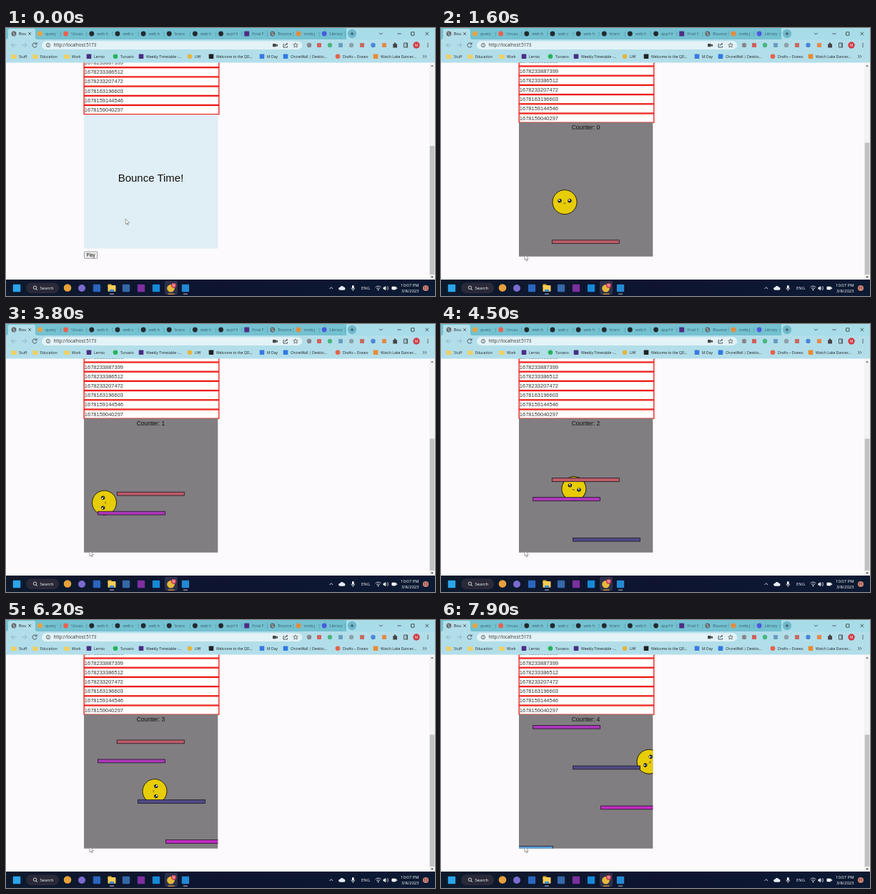
Recreate the animation shown at these times as an HTML page. Size 600 px wide and 375 px high, loop 8 s.

```html
<!DOCTYPE html>
<html lang="en">
<head>
<meta charset="utf-8">
<title>Bounce</title>
<style>
html, body { margin: 0; width: 100%; height: 100%; overflow: hidden; background: #fcfafc; }
svg { display: block; width: 600px; height: 375px; }
text { white-space: pre; }
.ui { font-family: "Open Sans", "Noto Sans", sans-serif; }
.page { font-family: "Liberation Sans", Arial, sans-serif; }
</style>
</head>
<body>
<svg id="stage" viewBox="0 0 600 375" xmlns="http://www.w3.org/2000/svg">
  <defs>
    <clipPath id="board"><rect x="109" y="132.3" width="187.3" height="187.5"/></clipPath>
    <linearGradient id="bar"><stop offset="0" stop-color="#0d1a2c"/><stop offset=".5" stop-color="#0e1430"/><stop offset="1" stop-color="#0c1a33"/></linearGradient>
  </defs>
  <rect width="600" height="375" fill="#fcfafc"/>
  <g id="rows"></g>
  <g id="menu"></g>
  <g id="game" clip-path="url(#board)">
    <rect x="109" y="132" width="188" height="188" fill="#807e80"/>
    <text id="counter" class="page" x="202.5" y="141.8" font-size="8.5" text-anchor="middle" fill="#111"></text>
    <g id="ball"></g>
    <g id="platforms"></g>
  </g>
  <g id="browser"></g>
  <g id="taskbar"></g>
  <path id="cursor" d="M0 0V7.6L1.8 6L3 8.7L4 8.2L2.9 5.6H5.2Z" fill="#fff" stroke="#555" stroke-width=".55"/>
</svg>
<script>
const $ = id => document.getElementById(id);

// markup helpers
const rect = (x, y, w, h, fill, extra = '') =>
  `<rect x="${x}" y="${y}" width="${w}" height="${h}" fill="${fill}" ${extra}/>`;
const dot = (x, y, r, fill, extra = '') => `<circle cx="${x}" cy="${y}" r="${r}" fill="${fill}" ${extra}/>`;
const line = (d, color = '#333', width = 0.8) =>
  `<path d="${d}" fill="none" stroke="${color}" stroke-width="${width}"/>`;
const label = (x, y, size, str, fill = '#222', extra = '', font = 'ui') =>
  `<text class="${font}" x="${x}" y="${y}" font-size="${size}" fill="${fill}" ${extra}>${str}</text>`;
const square = (x, y, size, fill) => rect(x - size / 2, y - size / 2, size, size, fill, 'rx=".8"');
const globe = (x, y) => dot(x, y, 3.4, '#5c6468') + line(`M${x - 2} ${y - 1}h3M${x - 1} ${y + 1.4}h3`, '#dcebef', 0.8);

function drawRows() {
  const ids = ['1678233891386', '1678233887399', '1678233386512', '1678233207472',
    '1678163196603', '1678159144546', '1678159040297'];
  $('rows').innerHTML = ids.map((id, i) => {
    const y = 42.5 + 13.2 * (i - 1);
    return rect(109.2, y, 188.6, 12.2, '#fff', 'stroke="#ec1712" stroke-width="1.3"') +
      label(109.8, y + 8.5, 7.5, id, '#333', '', 'page');
  }).join('');
}

function drawMenu() {
  $('menu').innerHTML = rect(109, 121.5, 187.5, 187, '#e0eef5') +
    label(202.5, 214.6, 15, 'Bounce Time!', '#111', 'text-anchor="middle"', 'page') +
    rect(109.5, 313, 18.3, 9.3, '#efefef', 'rx="1" stroke="#777" stroke-width=".7"') +
    label(118.6, 319.8, 6.3, 'Play', '#111', 'text-anchor="middle"', 'page');
}

function drawTabs() {
  const tabs = [['query', '#e8a33c'], ['Uncau', '#e9604f'], ['web h', '#24292f'], ['web s', '#24292f'],
    ['web h', '#24292f'], ['branc', '#24292f'], ['web h', '#24292f'], ['app14', '#24292f'],
    ['Final F', '#4b2e83'], ['Bounce', ''], ['node.j', '#e88a3a'], ['Library', '#4a5be0']];
  const first = rect(0, 0, 600, 16, '#a8dce9') + rect(0, 0, 476, 16, '#74c1d1') +
    '<path d="M0 16Q3 16 3 13V3Q3 1 5 1H38Q41 1 41 3V13Q41 16 44 16Z" fill="#b2deea"/>' +
    globe(11, 8) + label(18, 10.2, 5.6, 'Bou') + line('M31.3 6.2l3.6 3.6M34.9 6.2l-3.6 3.6');
  const rest = tabs.map(([name, color], i) => {
    const x = 47.5 + 36.15 * i;
    const icon = !color ? globe(x, 8) : i === 8 ? square(x, 8, 7, color) : dot(x, 8, 3.4, color);
    return icon + label(x + 7.5, 10.2, 5.5, name, '#33616e') + line(`M${x + 29} 5v6.5`, '#4b97aa', 0.6);
  }).join('');
  return first + rest + dot(484, 8, 6.2, '#70bace') + line('M481.5 8h5M484 5.5v5') +
    line('M522 6.8l2.3 2.3l2.3-2.3M547.5 8h5M566.5 5.8h4.4v4.4h-4.4ZM586.5 5.7l4.6 4.6M591.1 5.7l-4.6 4.6');
}

function drawToolbar() {
  const extensions = [[424, '#8a858c'], [438, '#d0605a'], [453, '#4cb583'], [468, '#6a9cc0'],
    [483, '#8fa0a8'], [498, '#c66a62'], [513.5, '#4a86d6'], [529, '#e08a4a']];
  return rect(0, 16, 600, 32.5, '#b2deea') +
    line('M14.5 24h-7M10.5 21l-3 3l3 3', '#84acb8') + line('M22 24h7M26 21l3 3l-3 3', '#84acb8') +
    line('M42.6 22.2A3.1 3.1 0 1 0 43 25M43 20.3v2.4h-2.4') +
    rect(50, 18.3, 364, 11.8, '#e2f2f7', 'rx="5.9"') +
    dot(59, 24, 2.7, 'none', 'stroke="#444" stroke-width=".7"') + line('M59 22.3v.7M59 23.6v2') +
    label(66.5, 26.3, 6.2, 'http://localhost:5173', '#333') +
    rect(373, 22, 4.8, 4.2, '#444', 'rx=".6"') + '<path d="M378 23.5l2-1v3.4l-2-1Z" fill="#444"/>' +
    line('M389 22.5h-1v4.5h5.5v-1.7M390 25q.4-3 3.6-2.8M392.3 20.8l1.5 1.4l-1.5 1.4') +
    line('M405 20.8l1 2.2l2.3.2l-1.8 1.5l.6 2.3l-2.1-1.3l-2.1 1.3l.6-2.3l-1.8-1.5l2.3-.2Z', '#444', 0.7) +
    extensions.map(([x, c], i) => i % 2 ? square(x, 24, 6, c) : dot(x, 24, 3.2, c)).join('') +
    '<path d="M541.2 22.2h1.6q-.2-2 1.2-2q1.4 0 1.2 2h1.8v5.4h-5.8Z" fill="#444"/>' +
    line('M556.5 21h5v6h-5ZM560 21v6') +
    dot(574, 24, 4.7, '#cf3b46') + label(574, 26, 5, 'M', '#fff', 'text-anchor="middle"') +
    dot(590, 21.7, 0.7, '#333') + dot(590, 24, 0.7, '#333') + dot(590, 26.3, 0.7, '#333');
}

function drawBookmarks() {
  const marks = [[11, 'Stuff', 'folder'], [41, 'Education', 'folder'], [85, 'Work', 'folder'],
    [116, 'Lernio', '#4b2e83'], [153, 'Tunavio', '#27b35a'], [189, 'Weekly Timetable -...', '#4b2e83'],
    [257, 'UW', '#e6b53c'], [287, 'Welcome to the QD...', '#222'], [358, 'M Day', '#3b78de'],
    [391, 'ChoreWall | Deskto...', '#2f7ae0'], [464, 'Drafts – Drawo', '#e5634a'],
    [517, 'Watch Lake Dancer...', '#e98b31']];
  return marks.map(([x, name, kind], i) => {
    const icon = kind === 'folder'
      ? `<path d="M${x - 3.6} 36.8h2.8l1 1h3.6v5.2h-7.4Z" fill="#f0cf62"/>`
      : i % 2 || i === 8 ? square(x, 39.8, 6.6, kind) : dot(x, 39.8, 3.3, kind);
    return icon + label(x + 7, 41.7, 5.15, name);
  }).join('') + line('M583 37.8l1.9 2l-1.9 2M586 37.8l1.9 2l-1.9 2');
}

function drawBrowser() {
  $('browser').innerHTML = drawTabs() + drawToolbar() + drawBookmarks() +
    rect(592, 48.5, 8, 304, '#f3f2f3') +
    '<path d="M594 54l2-2.6l2 2.6Z" fill="#777"/><path d="M594 347.5l2 2.6l2-2.6Z" fill="#555"/>' +
    '<rect id="thumb" x="592.7" width="6.6" fill="#c1c0c2"/>';
}

function drawTaskbar() {
  const apps = [[127, '#2b66bd'], [168, '#3568a8'], [189, '#7d2fa0'], [210, '#1689d6'], [251, '#2389d4']];
  const mid = 'text-anchor="middle"', end = 'text-anchor="end"';
  $('taskbar').innerHTML = rect(0, 352, 600, 23, 'url(#bar)') +
    square(15, 364, 10.5, '#2ba5ea') +
    rect(28, 356.3, 46, 15, '#29293a', 'rx="7.5"') +
    dot(40.5, 363.3, 2.2, 'none', 'stroke="#fff" stroke-width=".8"') + line('M42.1 365l2 2', '#fff') +
    label(47.5, 366.2, 6, 'Search', '#fff') +
    dot(86, 363.5, 5.3, '#e7a03a') + dot(106, 364, 5, '#7b6bd0') +
    apps.map(([x, c]) => square(x, 364, 10.3, c)).join('') +
    rect(142.5, 358.5, 5, 4, '#e0a92d') + rect(142.5, 360, 11, 8.8, '#f7cd55', 'rx=".8"') +
    rect(145, 366, 6, 2.8, '#3489d6') +
    rect(222, 354, 18, 19, '#2b3149', 'rx="2"') +
    dot(230.5, 364.2, 5.3, '#e5b83b') + dot(234.5, 360.3, 3.5, '#cf3b56') +
    label(234.5, 362, 4.5, 'M', '#fff', mid) +
    rect(145, 371.6, 6, 1.2, '#9aa7b3') + rect(226.5, 371.6, 9, 1.2, '#e8a33c') + rect(248, 371.6, 6, 1.2, '#9aa7b3') +
    line('M452.5 365l2.3-2.3l2.3 2.3', '#fff') +
    '<path d="M467 366.7a2 2 0 0 1 .2-4a2.8 2.8 0 0 1 5-.2a2.1 2.1 0 0 1 .4 4.2Z" fill="#e6edf3"/>' +
    rect(484, 360, 2.6, 4.8, '#fff', 'rx="1.3"') + line('M482.8 363.5q0 2.6 2.5 2.6t2.5-2.6M485.3 366v2', '#fff', 0.7) +
    label(503, 366.1, 5.8, 'ENG', '#fff', mid) +
    line('M516.7 362.8q3.8-3.4 7.6 0M518.2 364.7q2.3-2 4.6 0', '#fff') + dot(520.5, 366.4, 0.9, '#fff') +
    '<path d="M527.5 362.8h1.5l2-1.9v6.4l-2-1.9h-1.5Z" fill="#fff"/>' + line('M532.2 362.4q1.4 1.7 0 3.4M533.5 361q2.6 3.1 0 6.2', '#fff', 0.6) +
    rect(539.5, 361.8, 6, 4.4, '#fff', 'rx=".8"') + rect(546, 363, 1, 2, '#fff') +
    label(577.5, 361.8, 5.9, '10:07 PM', '#fff', end) + label(577.5, 369.8, 5.9, '3/8/2023', '#fff', end) +
    dot(587, 364, 4.1, '#c98172') + label(587, 365.8, 4.6, '11', '#2a1a1a', mid);
}

// Platforms rise steadily; y is the centre height at START.
const START = 1, RISE = 28, GRAVITY = 260, REST = 14.5;
const platforms = [
  { x: 155.3, y: 316, from: 1, color: '#bd5c68' },
  { x: 128.5, y: 343, from: 1.85, color: '#ad37bb' },
  { x: 184.5, y: 399.7, from: 3.85, color: '#514a86' },
  { x: 223.5, y: 455.7, from: 5.85, color: '#c32bc4' },
  { x: 62.5, y: 512, from: 7.85, color: '#5b9fda' }
];
const platformY = (p, t) => p.y - RISE * (t - START);

function drawGame() {
  $('platforms').innerHTML = platforms.map(p =>
    rect(p.x, 0, 94, 4.8, p.color, 'stroke="#1d1722" stroke-width=".8"')).join('');
  const eye = x => dot(x, -1.8, 2.7, '#17151c') + dot(x - 0.7, -2.7, 1.1, '#fff') + dot(x + 0.9, -0.8, 0.6, '#ddd');
  $('ball').innerHTML = dot(0, 0, 17, '#e7cc08', 'stroke="#17150a" stroke-width=".9"') +
    eye(-7) + eye(7) + line('M-1.7 1.2Q-.8 2.6 0 1.3Q.8 2.6 1.7 1.2', '#3b2a08', 0.7);
}

// Linear interpolation through [time, value] keys.
function track(keys, t) {
  const i = keys.findIndex(k => k[0] > t);
  if (i === 0) return keys[0][1];
  if (i < 0) return keys[keys.length - 1][1];
  const [t0, a] = keys[i - 1], [t1, b] = keys[i];
  return a + (b - a) * (t - t0) / (t1 - t0);
}

const ballX = [[2.7, 173], [3, 137.5], [4.1, 137.5], [5.2, 270.5], [5.25, 275], [5.65, 275], [6.2, 208], [6.3, 204], [7.2, 204], [7.9, 291]];
const ballTurn = [[2.7, 0], [3, -90], [4.1, -90], [5.2, 230], [5.25, 242], [5.65, 260], [6.2, 90], [6.3, 80], [7.2, 80], [7.9, 303]];
const squash = [[1.7, 0], [2.5, 1], [2.85, 0], [4.85, 0], [5.2, 1], [5.5, 0]];
const leaps = [1, 2.85, 4.85, 7.79];

// Free fall after each leap, until the next platform catches the ball.
function ballY(t) {
  const n = leaps.filter(s => s <= t).length - 1, began = leaps[n];
  const top = n ? platformY(platforms[n - 1], began) - REST : 150;
  return Math.min(top + GRAVITY * (t - began) ** 2, platformY(platforms[n], t) - REST);
}

function render(t) {
  const playing = t >= START;
  $('menu').style.display = playing ? 'none' : '';
  $('game').style.display = playing ? '' : 'none';
  $('rows').setAttribute('transform', `translate(0 ${playing ? 11.5 : 0})`);
  $('thumb').setAttribute('y', playing ? 160.5 : 165);
  $('thumb').setAttribute('height', playing ? 184.5 : 180);

  const k = Math.min(t / 0.8, 1), glide = k * k * (3 - 2 * k);
  $('cursor').setAttribute('transform', `translate(${167.2 - 50 * glide} ${267 + 50.3 * glide})`);
  if (!playing) return;

  $('counter').textContent = 'Counter: ' + Math.floor((t + 0.15) / 2);
  platforms.forEach((p, i) => {
    const el = $('platforms').children[i];
    el.setAttribute('y', platformY(p, t) - 2.4);
    el.style.display = t >= p.from ? '' : 'none';
  });
  const s = track(squash, t);
  $('ball').setAttribute('transform', `translate(${track(ballX, t)} ${ballY(t)}) ` +
    `scale(${1 + 0.07 * s} ${1 - 0.13 * s}) rotate(${track(ballTurn, t)})`);
}

drawRows();
drawMenu();
drawGame();
drawBrowser();
drawTaskbar();

const origin = performance.now();
function tick() {
  const ms = (performance.now() - origin) % 8000;
  render(Math.floor(ms / 100) / 10);
  requestAnimationFrame(tick);
}
tick();
</script>
</body>
</html>
```
